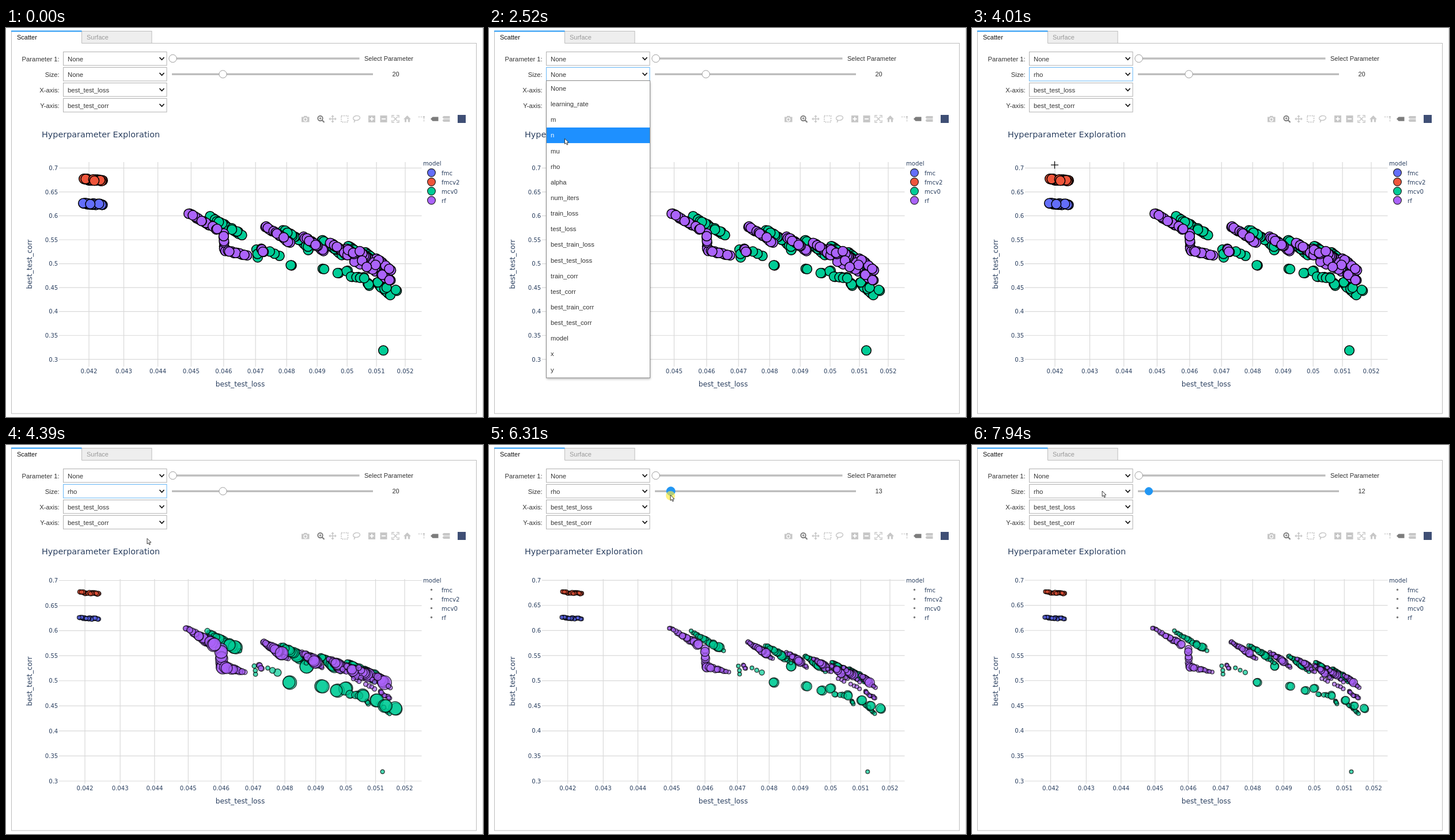
Write an HTML page with a canvas that moves like this. It is 828 px wide and 676 px high and loops after 8000 ms.

```html
<!DOCTYPE html>
<html lang="en">
<head>
<meta charset="utf-8">
<title>Hyperparameter Exploration</title>
<style>
html, body { margin: 0; width: 100%; height: 100%; overflow: hidden; background: #fff; }
canvas { display: block; }
</style>
</head>
<body>
<canvas id="stage" width="828" height="676"></canvas>
<script>
const ctx = document.getElementById('stage').getContext('2d');
const LOOP = 8000;
const UI = '"Liberation Sans", Arial, sans-serif';
const CHART = '"DejaVu Sans", Verdana, sans-serif';
const INK = '#2a3f5f', TEXT = '#333', BLUE = '#2196f3', GREY = '#bdbdbd';
const OPTIONS = ['None', 'learning_rate', 'm', 'n', 'mu', 'rho', 'alpha', 'num_iters',
  'train_loss', 'test_loss', 'best_train_loss', 'best_test_loss', 'train_corr',
  'test_corr', 'best_train_corr', 'best_test_corr', 'model', 'x', 'y'];
const ROW = 27.14, LIST_TOP = 91.5;

// ---- drawing helpers ----
function text(str, x, y, size, color = TEXT, align = 'left', font = UI) {
  ctx.font = `${size}px ${font}`;
  ctx.fillStyle = color;
  ctx.textAlign = align;
  ctx.fillText(str, x, y);
}
const label = (str, x, y, size, align) => text(str, x, y, size, INK, align, CHART);
function rect(x, y, w, h, fill, stroke) {
  if (fill) { ctx.fillStyle = fill; ctx.fillRect(x, y, w, h); }
  if (stroke) { ctx.strokeStyle = stroke; ctx.lineWidth = 1; ctx.strokeRect(x, y, w, h); }
}
function trace(p) {
  ctx.beginPath();
  for (let i = 0; i < p.length; i += 2) ctx.lineTo(p[i], p[i + 1]);
}
function line(color, width, ...p) {
  trace(p);
  ctx.strokeStyle = color;
  ctx.lineWidth = width;
  ctx.stroke();
}
function shape(color, ...p) {
  trace(p);
  ctx.fillStyle = color;
  ctx.fill();
}
function disc(x, y, r, fill, stroke, width = 1) {
  ctx.beginPath();
  ctx.arc(x, y, r, 0, 2 * Math.PI);
  if (fill) { ctx.fillStyle = fill; ctx.fill(); }
  if (stroke) { ctx.strokeStyle = stroke; ctx.lineWidth = width; ctx.stroke(); }
}

// ---- scatter data ----
let seed = 11;
const rnd = () => (seed = (seed * 16807) % 2147483647) / 2147483647;

// n bubbles strewn from one point to another, radius r0 to r1.
function run(n, r0, r1, x0, y0, x1, y1) {
  return Array.from({ length: n }, (_, k) => {
    const u = n > 1 ? Math.min(1, Math.max(0, (k + rnd() - 0.5) / (n - 1))) : 0;
    return {
      x: x0 + (x1 - x0) * u + rnd() - 0.5,
      y: y0 + (y1 - y0) * u + (rnd() - 0.5) * 2.5,
      r: (r0 + (r1 - r0) * u) * (0.85 + 0.15 * rnd()),
      z: rnd()
    };
  });
}
// Each sweep of the search falls off to the right, shorter every time.
function chain(x, y, k) {
  const dx = 16 + 34 * 0.5 ** k, dy = 12 + 16 * 0.5 ** k;
  const bubbles = run(20 - k, 5, 12, x, y, x + dx, y + dy);
  const tail = k ? run(4, 5, 4, x + dx + 3, y + dy + 3, x + dx + 10, y + dy + 9) : [];
  return [...bubbles, ...tail];
}
const SWEEPS = [[317, 322], [450, 345], [517, 363], [563, 373], [592, 384], [614, 389], [642, 400]];
const LARGE = [[495, 412], [524, 386], [551, 419], [577, 426], [592, 422], [622, 434], [645, 442], [660, 452], [678, 456]];
const shuffle = list => list.sort((a, b) => a.z - b.z);

const series = [
  { name: 'fmc', color: '#636efa', points: shuffle(run(28, 3.8, 3.8, 134, 305, 168, 307)) },
  { name: 'fmcv2', color: '#ef553b', points: shuffle(run(34, 3.8, 3.8, 135, 263, 168, 265)) },
  { name: 'mcv0', color: '#00cc96', points: shuffle([
    ...SWEEPS.slice(0, 5).flatMap(([x, y], k) => chain(x + (k ? 31 : 37), y + 6, k)),
    ...LARGE.flatMap(([x, y]) => run(2, 12, 12, x - 1, y, x + 1, y)),
    ...run(2, 4, 4, 403, 357, 410, 361),
    ...run(3, 4, 4, 435, 386, 438, 401),
    ...run(3, 4, 8, 457, 388, 477, 398),
    ...run(5, 7, 7, 598, 433, 615, 434),
    ...run(4, 4, 4, 627, 443, 631, 449),
    ...run(9, 4, 4, 649, 448, 667, 464),
    ...run(1, 4, 4, 655, 560.5, 655, 560.5)]) },
  { name: 'rf', color: '#ab63fa', points: shuffle([
    ...SWEEPS.flatMap(([x, y], k) => chain(x, y, k)),
    ...run(7, 12, 10, 378, 356, 379, 386),
    ...run(14, 12, 5, 379, 387, 418, 394),
    ...run(4, 5, 5, 443, 384, 447, 389),
    ...run(9, 4, 4, 604, 406, 655, 429),
    ...run(8, 4, 4, 653, 430, 668, 439)]) }
];

// ---- pointer ----
// Moves as [start, end, x, y]; each one leaves from where the last one ended.
const MOVES = [
  [500, 1110, 111, 80], [1890, 2680, 136, 217], [2760, 3060, 143, 238],
  [4310, 4620, 398, 49], [4700, 5080, 376, 82], [5540, 6310, 315, 87],
  [6630, 6710, 307, 87], [7240, 7700, 240, 80], [7870, 7940, 226, 80]
];
const STEP = 77;
function pointerAt(t) {
  let at = null, x0 = 79, y0 = 50;
  for (const [start, end, x, y] of MOVES) {
    if (t < start) break;
    const steps = Math.round((end - start) / STEP);
    const k = Math.min(steps, Math.floor((t - start) / (end - start) * steps + 0.05));
    const u = (k + 1) / (steps + 1);
    at = { x: x0 + (x - x0) * u, y: y0 + (y - y0) * u };
    [x0, y0] = [x, y];
  }
  return at;
}
function drawPointer(t, p) {
  if (!p) return;
  if (t >= 3920 && t < 4310) {
    line('#000', 1.2, 137, 238, 150, 238);
    line('#000', 1.2, 143.5, 231.5, 143.5, 244.5);
    return;
  }
  const pressed = t >= 1430 && t < 1500 || t >= 5390 && t < 7010;
  const tapped = t >= 3460 && t < 3540;
  if (pressed || tapped) disc(p.x, p.y + 1, pressed ? 8 : 4, 'rgba(255,235,59,0.65)');
  ctx.save();
  ctx.translate(p.x, p.y);
  trace([0, 0, 0, 9.5, 2.2, 7.6, 3.8, 11, 5.4, 10.3, 3.9, 7, 6.8, 6.8]);
  ctx.closePath();
  ctx.fillStyle = '#fff';
  ctx.fill();
  ctx.strokeStyle = '#222';
  ctx.lineWidth = 0.9;
  ctx.stroke();
  ctx.restore();
}

// ---- controls ----
function drawFrame() {
  rect(0, 0, 828, 676, '#fff');
  line('#dcdcdc', 1, 827.5, 0, 827.5, 676);
  rect(9.5, 26.5, 807, 643.5, null, GREY);
  rect(131.5, 5.5, 121.5, 21, '#eee', GREY);
  rect(9.5, 5.5, 122, 22, '#fff');
  line(GREY, 1, 9.5, 28, 9.5, 5.5);
  line(GREY, 1, 131.5, 26.5, 131.5, 5.5);
  rect(9, 4.5, 122.5, 2, BLUE);
  text('Scatter', 19, 20, 11, '#111');
  text('Surface', 140, 19.5, 11, '#999');
}
function select(name, value, row, focused) {
  const y = 41.5 + row * 27;
  text(name, 92.7, y + 16.5, 11.27, TEXT, 'right');
  rect(99.5, y, 179.5, 23.5, '#fff', focused ? '#64b5f6' : '#b0b0b0');
  text(value, 107, y + 16.5, 11.27);
  line('#111', 1.8, 266.5, y + 9.5, 270.5, y + 13.8, 274.5, y + 9.5);
}
function slider(x1, y, knob, r, active) {
  rect(288, y - 1.7, x1 - 288, 3.4, GREY);
  disc(knob, y, r, active ? BLUE : '#fff', active ? BLUE : '#9e9e9e');
}
function drawControls(value, t) {
  select('Parameter 1:', 'None', 0);
  select('Size:', t >= 3920 ? 'rho' : 'None', 1, t >= 1430 && t < 5390);
  select('X-axis:', 'best_test_loss', 2);
  select('Y-axis:', 'best_test_corr', 3);
  slider(613.5, 53, 289.5, 6.7, false);
  slider(637, 80.3, 376.5 + (value - 20) * 8.7, t >= 5390 && t < 7010 ? 7.5 : 6.6, t >= 5390);
  text('Select Parameter', 622, 57, 11);
  text(value, 676.5, 84, 11, TEXT, 'center');
}
function drawList(active) {
  const h = ROW * OPTIONS.length + 0.8;
  ctx.save();
  ctx.shadowColor = 'rgba(0,0,0,0.3)';
  ctx.shadowBlur = 4;
  ctx.shadowOffsetY = 2;
  rect(99.5, LIST_TOP, 180, h, '#fff');
  ctx.restore();
  OPTIONS.forEach((name, i) => {
    const y = LIST_TOP + i * ROW;
    if (i === active) rect(100, y, 179, ROW, '#1e90ff');
    text(name, 107, y + 17.5, 11.27, i === active ? '#fff' : TEXT);
  });
  rect(99.5, LIST_TOP, 180, h, null, '#8a8a8a');
}

// ---- chart ----
function drawToolbar() {
  const soft = '#c7c7c7', dark = '#7c7c7c', y = 158;
  const sides = [-1, 1];
  // camera, magnifier
  rect(513, 154.5, 13.5, 9, soft);
  rect(517, 152.8, 5.5, 3, soft);
  disc(519.7, 159, 2.8, soft, '#fff', 1.3);
  disc(545.5, 157, 4.2, null, dark, 1.9);
  line(dark, 2.2, 548.5, 160, 552.5, 164);
  line(dark, 1.2, 543.5, 157, 547.5, 157);
  line(dark, 1.2, 545.5, 155, 545.5, 159);
  // four-way arrow
  line(soft, 1.5, 561, y, 573, y);
  line(soft, 1.5, 567, 152, 567, 164);
  for (const s of sides) {
    shape(soft, 567 + s * 6.8, y, 567 + s * 3.8, y - 2.8, 567 + s * 3.8, y + 2.8);
    shape(soft, 567, y + s * 6.8, 564.2, y + s * 3.8, 569.8, y + s * 3.8);
  }
  // box select, lasso
  ctx.setLineDash([2, 1.8]);
  line(soft, 1.8, 582, 152.5, 593.5, 152.5, 593.5, 163.5, 582, 163.5, 582, 152.5);
  line(soft, 1.6, 716, 154.5, 725.5, 154.5, 725.5, 163.5);
  ctx.setLineDash([]);
  ctx.beginPath();
  ctx.ellipse(608.5, 156.5, 6, 4, -0.2, 0, 2 * Math.PI);
  ctx.strokeStyle = soft;
  ctx.lineWidth = 1.5;
  ctx.stroke();
  line(soft, 1.5, 604, 159, 605.5, 161.5, 604, 164);
  // plus, minus
  for (const x of [635, 655.5]) {
    rect(x - 6, 152, 12, 12, soft);
    line('#fff', 2, x - 3.5, y, x + 3.5, y);
  }
  line('#fff', 2, 635, 154.5, 635, 161.5);
  // fit, home
  for (const a of sides) {
    line(soft, 1.4, 672, y - 4 * a, 680, y + 4 * a);
    for (const b of sides) {
      const x = 676 + a * 6, z = y + b * 6;
      line(soft, 1.5, x - a * 4, z, x, z, x, z - b * 4);
    }
  }
  shape(soft, 690, 158.5, 696.5, 152, 703, 158.5);
  rect(692, 158, 3, 5.5, soft);
  rect(698, 158, 3, 5.5, soft);
  // spike, hover tags, badge
  disc(725.5, 154.5, 1.6, soft);
  shape(dark, 737, y, 740.5, 154.5, 750.5, 154.5, 750.5, 161.8, 740.5, 161.8);
  for (const s of sides) {
    const z = y + s * 2.8;
    shape(soft, 757.5, z, 759.5, z - 2.2, 770.5, z - 2.2, 770.5, z + 2.2, 759.5, z + 2.2);
  }
  rect(784, 151, 14, 14, '#3f4f75');
}
function drawChart(size) {
  const sized = size !== null;
  const lost = sized ? 20 - size : 0;
  const left = sized ? 137 - lost * 0.06 : 144;
  const wide = sized ? 555 + lost * 0.72 : 549;
  const top = sized ? 235.5 - lost * 0.06 : 243.3;
  const high = sized ? 348.5 + lost * 0.06 : 332.5;

  label('Hyperparameter Exploration', 62, 190, 14.37);
  for (let i = 42; i <= 52; i++) {
    const x = left + wide * Math.log(i / 42) / Math.log(52 / 42);
    line('#d9d9d9', 1.2, x, 233, x, 588.5);
    label(String(i / 1000), x, 600.3, 10.14, 'center');
  }
  for (let i = 0; i <= 8; i++) {
    const y = top + high * i / 8;
    line('#d9d9d9', 1.2, 92, y, 721.5, y);
    label(String((70 - 5 * i) / 100), 90.3, y + 3.7, 10.14, 'right');
  }
  label('best_test_loss', 406.5, 623, 12.2, 'center');
  ctx.save();
  ctx.translate(45, 410.5);
  ctx.rotate(-Math.PI / 2);
  label('best_test_corr', 0, 0, 12.2, 'center');
  ctx.restore();

  ctx.globalAlpha = sized ? 0.7 : 1;
  for (const { color, points } of series) {
    for (const p of points) {
      const x = left + (p.x - 144) * wide / 549;
      const y = top + (p.y - 243.3) * high / 332.5;
      disc(x, y, sized ? Math.max(3.3, p.r * size / 20) : 8.3, color, '#000', 1.5);
    }
  }
  ctx.globalAlpha = 1;

  label('model', 724, 239, 10.14);
  series.forEach(({ name, color }, i) => {
    const y = 251.5 + i * 16;
    if (sized) disc(738.5, y, 1.7, '#777');
    else disc(738.5, y, 6.9, color, '#222', 1.2);
    label(name, 756, y + 4, 10.14);
  });
  drawToolbar();
}

// ---- timeline ----
function valueAt(t) {
  if (t < 5540) return 20;
  if (t >= 6630) return 12;
  return Math.max(13, Math.round(20 + (pointerAt(t).x - 377) / 8.7));
}
// The chart trails the slider while it is dragged.
function bubbleSize(t) {
  if (t < 4100) return null;
  if (t >= 7010) return 12;
  if (t >= 6390) return 13;
  return Math.max(14, valueAt(t - STEP));
}
function draw(t) {
  const p = pointerAt(t);
  drawFrame();
  drawChart(bubbleSize(t));
  drawControls(valueAt(t), t);
  if (t >= 1500 && t < 3920) drawList(Math.max(0, Math.floor((p.y - LIST_TOP) / ROW)));
  drawPointer(t, p);
}
const begin = performance.now();
function tick() {
  draw((performance.now() - begin) % LOOP);
  requestAnimationFrame(tick);
}
tick();
</script>
</body>
</html>
```
